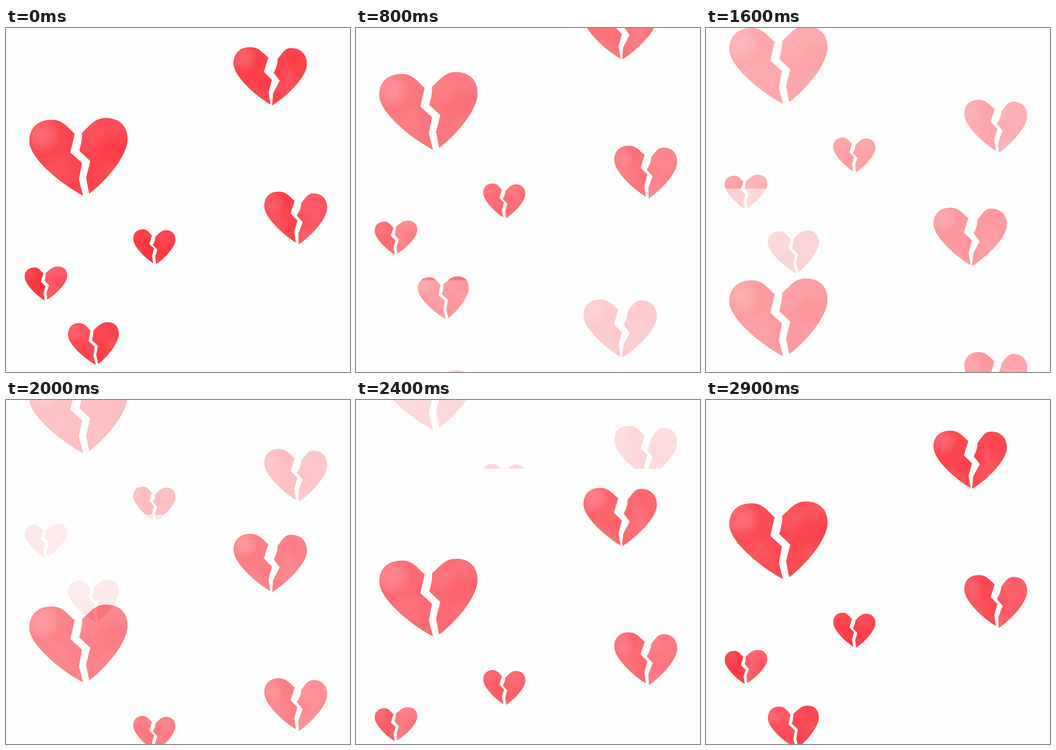
These frames come from a looping animation (748x748 px, 3000 ms). An HTML page:

```html
<!DOCTYPE html>
<html lang="en">
<head>
<meta charset="utf-8">
<title>Broken hearts</title>
<style>
  html, body { margin: 0; width: 100%; height: 100%; overflow: hidden; background: #fefefe; }
  svg { display: block; width: 100vw; height: 100vh; }
</style>
</head>
<body>
<svg viewBox="0 0 748 748">
  <defs>
    <g id="hearts"></g>
    <clipPath id="above"><rect id="window" width="748" height="748"/></clipPath>
  </defs>
  <rect width="748" height="748" fill="#fefefe"/>
  <g clip-path="url(#above)"><use id="leaving" href="#hearts"/></g>
  <g id="arriving">
    <rect width="748" height="748" fill="#fefefe"/>
    <use href="#hearts"/>
  </g>
</svg>
<script>
const SIZE = 748, LOOP = 3000, STEP = 100;
const LIGHT = '#ff7a86', DARK = '#f8262f', EDGE = '#f42b36';
// Crack corners: depth within the heart, sideways offset from shoulder-to-tip line
const SHOULDER = 0.18;
const KNEES = [[0.43, -0.07], [0.57, 0.035], [0.79, -0.02]];

const $ = id => document.getElementById(id);
const art = $('hearts');
const mix = (a, b, k) => a + (b - a) * k;

let seed = 7, washes = 0;
function random() {
  seed = seed * 16807 % 2147483647;
  return seed / 2147483647;
}

function add(parent, tag, attrs) {
  const el = document.createElementNS('http://www.w3.org/2000/svg', tag);
  for (const k in attrs) el.setAttribute(k, attrs[k]);
  return parent.appendChild(el);
}

// Outer curve: tip, widest side, top of the lobe, shoulder at the crack
function rim([tx, ty], [sx, sy], [px, py], [ex, ey]) {
  const rise = ty - sy, dx = ex - px, dy = ey - py;
  return `M${tx} ${ty}` +
    `C${mix(tx, sx, 0.42)} ${ty - rise * 0.22} ${sx} ${sy + rise * 0.31} ${sx} ${sy}` +
    `C${sx} ${mix(sy, py, 0.63)} ${mix(px, sx, 0.63)} ${py} ${px} ${py}` +
    `C${px + dx * 0.5} ${py} ${ex - dx * 0.3} ${ey - dy * 0.4} ${ex} ${ey}`;
}

function wash(d, cx, cy, r, tint, strength) {
  const id = 'wash' + washes++;
  const g = add(art, 'radialGradient', { id, cx, cy, r, gradientUnits: 'userSpaceOnUse' });
  [1, 0.7, 0].forEach((k, i) =>
    add(g, 'stop', { offset: i / 2, 'stop-color': tint, 'stop-opacity': strength * k }));
  add(art, 'path', { d, fill: `url(#${id})` });
}

// Flat colour with a few soft watercolour patches
function paint(d, color, x, y, w, h, pale) {
  add(art, 'path', { d, fill: color });
  for (let i = 0; i < 4; i++) {
    wash(d, x + w * random(), y + h * random(), w * mix(0.25, 0.5, random()),
      i % 2 ? LIGHT : DARK, 0.25);
  }
  wash(d, x + w * 0.25, y + h * 0.2, w * 0.4, LIGHT, pale);
  add(art, 'path', { d, fill: 'none', stroke: EDGE, 'stroke-opacity': 0.5, 'stroke-linejoin': 'round' });
}

// shift: how far the right half hangs below the left one.
// shoulder, tip, notch: places across the width. gap: crack width at knee and tip.
function heart({ box: [x0, y0, x1, y1], shift, shoulder, tip, notch, gap, colors }) {
  const w = x1 - x0, h = y1 - y0 - Math.abs(shift);
  const top = y0 + Math.max(0, -shift);
  const X = k => x0 + w * k, Y = k => top + h * k;
  const knees = KNEES.map(([y, off]) =>
    [X(mix(shoulder, tip, (y - SHOULDER) / (1 - SHOULDER)) + off), Y(y)]);
  const across = KNEES.map(([y], i) =>
    [knees[i][0] + mix(gap[0], gap[1], (y - 0.43) / 0.57), knees[i][1] + shift]);

  const left = rim([X(tip), Y(1)], [x0, Y(0.28)], [X(0.23), top], [X(shoulder), Y(SHOULDER)]) +
    'L' + knees + 'Z';

  const end = [X(notch), Y(0.19) + shift], [kx, ky] = across[0];
  const right = rim([X(tip) + gap[1], Y(1) + shift], [x1, Y(0.28) + shift], [X(0.78), top + shift], end) +
    `Q${end[0]} ${(end[1] + ky) / 2} ${kx} ${ky}L` + across.slice(1) + 'Z';

  const pale = 0.7 * w / 214;
  paint(left, colors[0], x0, top, w / 2, h, pale);
  paint(right, colors[1], x0 + w / 2, top + shift, w / 2, h, pale / 3);
}

heart({ box: [51, 196, 264, 364], shift: -4, shoulder: 0.46, tip: 0.545, notch: 0.54, gap: [20, 14], colors: ['#fc464f', '#fc464f'] });
heart({ box: [495, 42, 654, 168], shift: 2, shoulder: 0.472, tip: 0.503, notch: 0.604, gap: [22, 4], colors: ['#fc424a', '#fc434c'] });
heart({ box: [562, 356, 698, 470], shift: 4, shoulder: 0.48, tip: 0.5, notch: 0.59, gap: [14, 7], colors: ['#fc444d', '#fe5863'] });
heart({ box: [277, 438, 368, 513], shift: 2, shoulder: 0.44, tip: 0.47, notch: 0.53, gap: [8, 7], colors: ['#fd363f', '#fd3c45'] });
heart({ box: [41, 519, 133, 592], shift: -2, shoulder: 0.435, tip: 0.467, notch: 0.5, gap: [9, 6], colors: ['#fc353e', '#fe5a65'] });
heart({ box: [135, 640, 245, 732], shift: -2, shoulder: 0.44, tip: 0.545, notch: 0.505, gap: [8, 6], colors: ['#fd4b55', '#fc424b'] });

// Traces too faint to see vanish altogether.
const visible = a => a < 0.05 ? 0 : a;

function draw(ms) {
  const t = Math.floor(ms % LOOP / STEP) * STEP / LOOP;
  const edge = SIZE * (1 - t);
  const old = $('leaving'), fresh = $('arriving');
  old.setAttribute('transform', `translate(0 ${-SIZE / 2 * t})`);
  old.setAttribute('opacity', visible(1 - t));
  fresh.setAttribute('transform', `translate(0 ${edge})`);
  fresh.setAttribute('opacity', t);
  $('window').setAttribute('height', visible((1 - t) ** 2) ? SIZE : edge);
}

const start = performance.now();
function tick(now) {
  draw(Math.max(0, now - start));
  requestAnimationFrame(tick);
}
draw(0);
requestAnimationFrame(tick);
</script>
</body>
</html>
```
